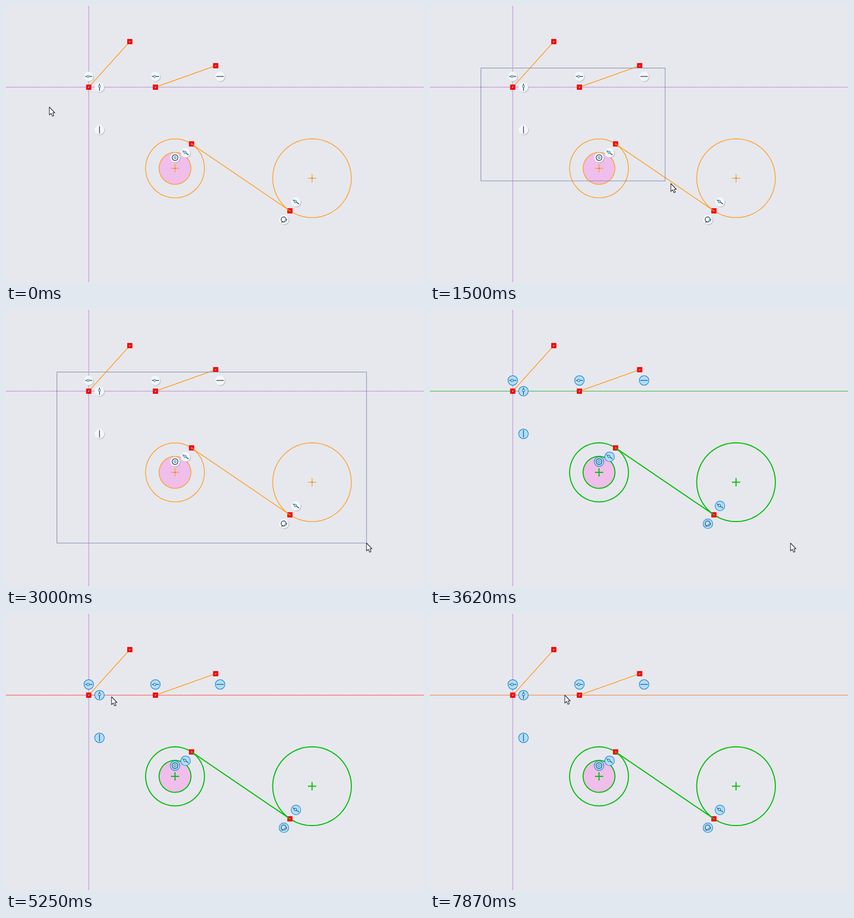
An HTML page for the animation above (8 s loop, 800 px wide and 527 px high).

```html
<!DOCTYPE html>
<html lang="en">
<head>
<meta charset="utf-8">
<title>Sketch selection</title>
<style>
  html, body { margin: 0; width: 100%; height: 100%; overflow: hidden; background: #e7e8ed; }
  svg { display: block; width: 800px; height: 527px; }
  #sketch { --ink: #ff9c1c; --weight: 1.4; }
  #sketch.picked { --ink: #00bf0a; --weight: 2; }
  .edge { fill: none; stroke: var(--ink); stroke-width: var(--weight); }
  .loose { stroke: #ff9c1c; stroke-width: 1.4; }
  .dots { stroke: #a95fd0; stroke-width: 1.5; stroke-dasharray: 1 1; }
  .disc { fill: #f5f6f8; }
  .shade { fill: #8c8f99; opacity: .55; }
  .glyph { fill: none; stroke: #3c4650; stroke-width: 1.4; }
  .knob { fill: #a9dcf2; stroke: #3f8fb4; }
  .picked .disc { fill: #aedffb; stroke: #2484c8; stroke-width: 1.2; }
  .picked .shade, .picked .hub { display: none; }
  .picked .glyph { stroke: #355c78; }
  .picked .knob { fill: #c0e5fa; stroke: #355c78; }
</style>
</head>
<body>
<svg viewBox="0 0 800 527">
  <g id="sketch"></g>
  <rect id="band" x="97.5" y="118.5" fill="none" stroke="#7b86ad"/>
  <g id="bar" transform="translate(690 355)">
    <rect x="3" y="3" width="86" height="31" fill="#99919f" opacity=".65"/>
    <rect x=".5" y=".5" width="86" height="31" fill="#f7f7fa" stroke="#c3bdc6"/>
    <g fill="none" stroke="#55555d" stroke-width="1.2">
      <path d="M8 10v5h5M8 15a7.5 7.5 0 0 1 13-4M24 22v-5h-5M24 17a7.5 7.5 0 0 1-13 4M12 20l8-8"/>
      <path d="M35 7v18" stroke-dasharray="4 2"/>
      <path d="M38 9h4M38 23h4" stroke-dasharray="2 1"/>
      <circle cx="46" cy="16" r="5" stroke-dasharray="2.5 1.5"/>
      <path d="M62 7v17l5-4M62 7l12 11" stroke="#a08d99"/>
      <circle cx="70" cy="15" r="5" fill="#d9eef6" stroke="#7199a8"/>
      <path d="M73 19l5 6" stroke="#66727c" stroke-width="2"/>
    </g>
  </g>
  <path id="cursor" d="M0 0V15L3.500 12 6 17.500 8.600 16.300 6.200 11H10.500Z"
        fill="#fff" stroke="#22242a" stroke-width="1.1" stroke-linejoin="round"/>
</svg>
<script>
const $ = id => document.getElementById(id);
const LOOP = 8000, STEP = 125;
const PRESS = 1000, RELEASE = 3625, DESELECT = 7500;
const AXIS_Y = 155, GAP = 20.5;

const shift = ([x, y], dx, dy) => [x + dx, y + dy];

const line = ([x1, y1], [x2, y2], cls = 'edge', extra = '') =>
  `<line x1="${x1}" y1="${y1}" x2="${x2}" y2="${y2}" class="${cls}" ${extra}/>`;

const place = ([x, y], body) => `<g transform="translate(${x} ${y})">${body}</g>`;

// Circles are drawn as facets, like a CAD display mesh.
function ring({ c: [x, y], r }, fill = 'none') {
  const sides = Math.round(16 + r * 0.42);
  const pts = Array.from({ length: sides }, (_, i) => {
    const a = i / sides * 2 * Math.PI;
    return [x + r * Math.cos(a), y + r * Math.sin(a)].map(v => v.toFixed(2));
  });
  return `<polygon points="${pts.join(' ')}" class="edge" style="fill:${fill}"/>`;
}

const cross = p => line(shift(p, -8, 0), shift(p, 8, 0)) + line(shift(p, 0, -8), shift(p, 0, 8)) +
  place(p, '<circle class="hub" r="1.2" fill="#6f8fa0"/>');

const node = p => place(p, `<rect x="-5" y="-5" width="10" height="10" fill="#f00606"/>
  <path d="M-2 2L2-2" stroke="#b85566"/><circle r="1.2" fill="#e0a0ac"/>`);

const slider = '<path class="glyph" d="M-7 0H7"/><circle class="knob" cx="-1.5" r="2.3"/>';
const turned = deg => `<g transform="rotate(${deg})">${slider}</g>`;
const glyphs = {
  onH: slider,
  onV: turned(90),
  slope: turned(35),
  flat: '<path class="glyph" d="M-7 0H7"/>',
  upright: '<path class="glyph" d="M0-7V7"/>',
  concentric: '<circle class="glyph" r="5.5"/><circle class="knob" r="2.3"/>',
  tangent: `<circle class="glyph" cx="-.5" cy="-.5" r="4.8"/>
    <path class="glyph" d="M-5 5L-1 4M1 4L6 0"/><circle class="knob" cx="2.5" cy="2.5" r="1.5"/>`
};
const badge = (kind, p) => place(p,
  `<circle class="shade" cx="1" cy="1" r="9.2"/><circle class="disc" r="9.2"/>${glyphs[kind]}`);

// Sketch geometry: the belt is the inner tangent of two circles.
const origin = [158.4, AXIS_Y], tipA = [237, 68], footB = [286, AXIS_Y], tipB = [401.3, 114];
const left = { c: [323.5, 310], r: 56.4 }, core = { c: left.c, r: 30.6 };
const right = { c: [585.7, 328.8], r: 75.3 };
const dx = right.c[0] - left.c[0], dy = right.c[1] - left.c[1];
const normal = Math.atan2(dy, dx) - Math.acos((left.r + right.r) / Math.hypot(dx, dy));
const along = (p, d) => shift(p, d * Math.cos(normal), d * Math.sin(normal));
const beltA = along(left.c, left.r), beltB = along(right.c, -right.r);

$('sketch').innerHTML = [
  line([origin[0], 0], [origin[0], 527], 'dots'),
  line([0, AXIS_Y], [800, AXIS_Y], 'dots', 'id="axis"'),
  line(origin, tipA, 'loose'), line(footB, tipB, 'loose'),
  ring(left), ring(core, '#efbeeb'), ring(right),
  cross(left.c), cross(right.c),
  ...[origin, tipA, footB, tipB, beltA, beltB].map(node),
  line(beltA, beltB),
  badge('onH', shift(origin, 0, -GAP)),
  badge('onV', shift(origin, GAP, 0)),
  badge('upright', shift(origin, GAP, 81.5)),
  badge('onH', shift(footB, 0, -GAP)),
  badge('flat', shift(tipB, 8.5, GAP)),
  badge('concentric', shift(left.c, 0, -GAP)),
  badge('slope', along(beltA, -GAP)),
  badge('slope', along(beltB, GAP)),
  badge('tangent', along(beltB, -GAP))
].join('');

// Pointer stops: arrival time, place, pause.
const stops = [
  [0, 83, 193, 250], [875, 98, 118, 125], [1375, 356, 290, 0], [1500, 461, 339, 0],
  [2125, 690, 445, 1500], [4125, 669.5, 452, 375], [5125, 202, 158, 125],
  [5750, 236, 36, 0], [6250, 257, 135, 500], [7000, 258, 155, 1000]
];

function pointer(t) {
  const i = stops.findLastIndex(s => s[0] <= t);
  const [t0, x0, y0, pause] = stops[i], [t1, x1, y1] = stops[i + 1] || [LOOP, x0, y0];
  const k = Math.max(0, t - t0 - pause) / (t1 - t0 - pause || 1);
  return [x0 + (x1 - x0) * k, y0 + (y1 - y0) * k];
}

const show = (el, on) => { el.style.display = on ? '' : 'none'; };

function draw(now) {
  const t = Math.floor((now % LOOP + 5) / STEP) * STEP % LOOP;
  const [x, y] = pointer(t);
  $('cursor').setAttribute('transform', `translate(${x} ${y})`);

  const dragging = t > PRESS && t < RELEASE;
  const axisPicked = t >= RELEASE && t < DESELECT;
  const hover = !dragging && Math.abs(y - AXIS_Y) < 10;
  const axis = $('axis').style;
  axis.stroke = hover ? (axisPicked ? '#ff4038' : '#ed7428') : axisPicked ? '#22ad2b' : '';
  axis.strokeWidth = hover || axisPicked ? 2.2 : '';

  $('sketch').classList.toggle('picked', t >= RELEASE);
  show($('bar'), t >= 4000 && t < 4750);

  // The band trails the pointer slightly.
  const [bx, by] = pointer(Math.max(PRESS, t - 13)).map(Math.round);
  show($('band'), dragging);
  $('band').setAttribute('width', Math.max(0, bx - 97.5));
  $('band').setAttribute('height', Math.max(0, by - 118.5));
}

const start = performance.now();
function tick() {
  draw(performance.now() - start);
  requestAnimationFrame(tick);
}
tick();
</script>
</body>
</html>
```
